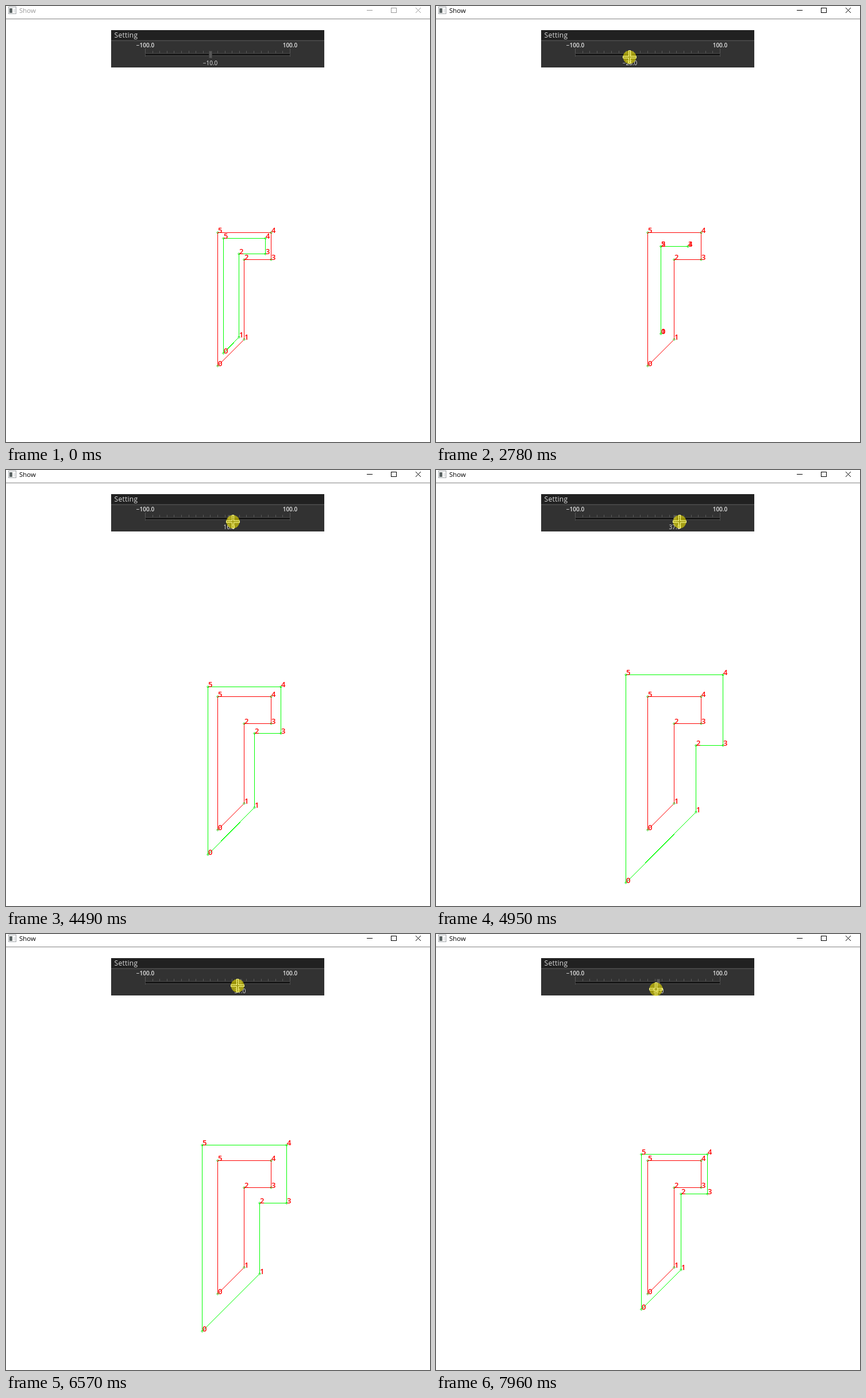
These frames come from a looping animation (738x759 px, 8 s). An HTML page:

```html
<!DOCTYPE html>
<html lang="en">
<head>
<meta charset="utf-8">
<title>Polygon offset</title>
<style>
  html, body { margin: 0; width: 100%; height: 100%; overflow: hidden; background: #fff; }
  svg { display: block; width: 100%; height: 100%; }
  text { font-family: "Open Sans", "Noto Sans", sans-serif; }
  .crisp { shape-rendering: crispEdges; }
  .digit { font-size: 13px; font-weight: 600; fill: #f00; }
  .scale { font-size: 10px; fill: #e4e4e4; text-anchor: middle; }
</style>
</head>
<body>
<svg id="stage" viewBox="0 0 738 759">
  <rect width="738" height="759" fill="#fff"/>

  <g class="crisp">
    <rect x="4.5" y="1.5" width="13" height="12" fill="#f6f6f6" stroke="#a4a8ac"/>
    <rect x="6" y="4" width="5" height="8" fill="#5c6464"/>
    <path d="M13 6.5h3M13 8.5h3M13 10.5h3" stroke="#d4d8dc"/>
    <path d="M0 22.5H738" stroke="#858585"/>
  </g>
  <text id="title" x="23" y="12" font-size="11.5">Show</text>
  <g id="buttons" fill="none">
    <path class="crisp" d="M628 7.5h10M670.5 3.5h9v8h-9z"/>
    <path d="M713 3l9 9M722 3l-9 9"/>
  </g>

  <g class="crisp">
    <rect x="183" y="42" width="371" height="65" fill="#323232"/>
    <rect x="183" y="42" width="371" height="17" fill="#212121"/>
    <path d="M183 60.5H554" stroke="#525252"/>
    <path id="ticks" stroke="#585858"/>
    <rect x="242.5" y="82.5" width="252" height="4" fill="#161616" stroke="#4a4a4a"/>
  </g>
  <text x="188.5" y="55" font-size="12" letter-spacing=".3" fill="#dedede">Setting</text>
  <text class="scale" x="242.5" y="72" font-weight="600">−100.0</text>
  <text class="scale" x="494.5" y="72" font-weight="600">100.0</text>
  <g id="handle">
    <rect class="crisp" x="-2.5" y="78.5" width="5" height="12" fill="#585858" stroke="#424242"/>
    <text id="value" class="scale" y="102.5"></text>
  </g>

  <g id="base"></g>
  <g id="offset"></g>

  <g id="cursor">
    <circle r="11.5" fill="#f0e400" fill-opacity=".6"/>
    <path class="crisp" fill="none" stroke="#ffff8c"
      d="M-1.5-11.5h3v10h10v3h-10v10h-3v-10h-10v-3h10z"/>
  </g>
</svg>
<script>
const LOOP = 8000, STEP = 77;            // the picture is redrawn about every STEP ms
const CENTER = 368.5, PER_UNIT = 1.26;   // slider geometry
const START_VALUE = -10, PRESS = 2320;
const SHAPE_LAG = 0.0455, HANDLE_LAG = 0.118;   // shares of a move
const ENTRY = [729, 851];

// Pointer moves: first redraw, last redraw, end x, end y
const MOVES = [
  [210, 980, 349, 85], [1070, 1070, 351, 82], [1620, 1770, 355.9, 86],
  [2320, 2780, 336.8, 89], [3100, 3170, 325, 89], [3570, 3630, 316.8, 90],
  [3950, 4720, 402.5, 90], [4800, 5570, 449, 91], [5640, 5870, 455, 96],
  [6040, 6660, 400, 90], [6820, 7280, 451.8, 97], [7430, 8036, 381.5, 96]
];

// The shape in its own units, and the direction each corner moves per unit of offset
const DIAG = Math.SQRT2;
const CORNERS = [
  [0, 250, -1, DIAG + 1], [50, 200, 1, DIAG - 1], [50, 50, 1, 1],
  [100, 50, 1, 1], [100, 0, 1, -1], [0, 0, -1, -1]
];

const $ = id => document.getElementById(id);
const snap = n => Math.floor(n) + 0.5;
const toX = u => snap(368.76 + 0.9245 * Math.round(u));
const toY = u => snap(394.85 + 0.9265 * Math.round(u));
const easeOut = u => 1 - Math.pow(1 - Math.max(0, u), 1.9);

function add(parent, tag, attrs) {
  const el = document.createElementNS("http://www.w3.org/2000/svg", tag);
  for (const key in attrs) el.setAttribute(key, attrs[key]);
  return parent.appendChild(el);
}

function makePolygon(group, color) {
  const outline = add(group, "path", { class: "crisp", fill: "none", stroke: color });
  const marks = CORNERS.map((_, i) => {
    const g = add(group, "g", {});
    add(g, "path", { d: "M-2 0L0-2L2 0L0 2Z", fill: "none", stroke: "#00e000", "stroke-width": 0.9 });
    add(g, "text", { class: "digit", x: 0.5, y: 0.5 }).textContent = i;
    return g;
  });
  return value => {
    const pts = CORNERS.map(([x, y, dx, dy]) => [toX(x + value * dx), toY(y + value * dy)]);
    outline.setAttribute("d", `M${pts.join("L")}Z`);
    marks.forEach((m, i) => m.setAttribute("transform", `translate(${pts[i]})`));
  };
}

// Returns a function giving the pointer position, optionally lagging behind
function motionAt(time) {
  const i = Math.max(0, MOVES.filter(m => m[0] <= time).length - 1);
  const [first, last, x1, y1] = MOVES[i];
  const [x0, y0] = i ? MOVES[i - 1].slice(2) : ENTRY;
  const gaps = Math.round((last - first) / STEP);
  const gap = (last - first) / gaps || STEP;
  const done = Math.min(gaps, Math.floor((time - first) / gap + 0.1)) + 1;
  const share = done / (gaps + 1);
  return (lag = 0) => {
    const u = easeOut(share - lag);
    return [x0 + (x1 - x0) * u, y0 + (y1 - y0) * u];
  };
}

let ticks = "M242.5 74V88M494.5 74V88";
for (let i = 1; i < 20; i++) ticks += `M${snap(242.5 + i * 12.6)} 78V82`;
$("ticks").setAttribute("d", ticks);

makePolygon($("base"), "#f00")(0);
const drawOffset = makePolygon($("offset"), "#0f0");

function render(time) {
  const active = time >= PRESS;
  const ink = active ? "#000" : "#999";
  $("title").setAttribute("fill", ink);
  $("buttons").setAttribute("stroke", ink);

  const pointer = motionAt(time);
  const value = lag => active ? Math.round((pointer(lag)[0] - CENTER) / PER_UNIT) : START_VALUE;

  const shown = value(HANDLE_LAG);
  $("handle").setAttribute("transform", `translate(${snap(CENTER + shown * PER_UNIT)})`);
  $("value").textContent = (shown < 0 ? "−" : "") + Math.abs(shown).toFixed(1);
  drawOffset(value(SHAPE_LAG));

  $("cursor").setAttribute("visibility", time < MOVES[0][0] ? "hidden" : "visible");
  $("cursor").setAttribute("transform", `translate(${pointer().map(Math.round)})`);
}

const begin = performance.now();
function tick() {
  render((performance.now() - begin) % LOOP);
  requestAnimationFrame(tick);
}
tick();
</script>
</body>
</html>
```
